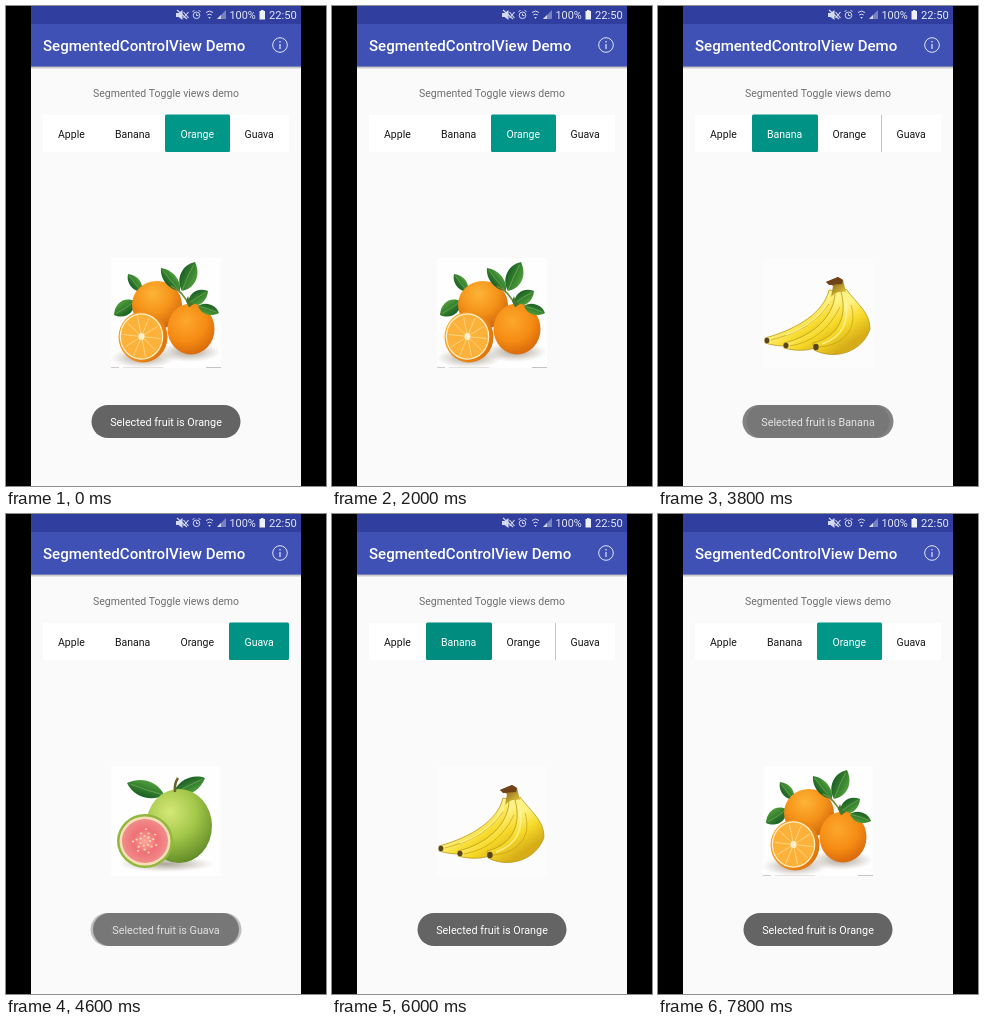
Animation, 320 px wide and 480 px high, one loop 8000 ms. Source, as an HTML page with a canvas:

```html
<!DOCTYPE html>
<html lang="en">
<head>
<meta charset="utf-8">
<title>SegmentedControlView Demo</title>
<style>
  html, body { margin: 0; width: 100%; height: 100%; overflow: hidden; background: #000; }
  canvas { display: block; width: 320px; height: 480px; }
</style>
</head>
<body>
<canvas id="stage"></canvas>
<script>
const canvas = document.getElementById('stage');
const ctx = canvas.getContext('2d');
const ratio = window.devicePixelRatio || 1;
canvas.width = 320 * ratio;
canvas.height = 480 * ratio;
ctx.scale(ratio, ratio);

const LOOP = 8000, FADE = 400, TOAST_DELAY = 100;
const APPLE = 0, BANANA = 1, ORANGE = 2, GUAVA = 3;

const segments = [
  { name: 'Apple', x: 37, end: 94, label: 52, toast: 143 },
  { name: 'Banana', x: 94, end: 160, label: 109, toast: 151 },
  { name: 'Orange', x: 159, end: 224, label: 174.5, toast: 149 },
  { name: 'Guava', x: 223, end: 283, label: 238.5, toast: 146 }
];

// Taps: time, fruit, and optionally when its toast leaves by itself.
const taps = [
  { at: -1000, fruit: ORANGE, leave: 1500 },
  { at: 2130, fruit: APPLE },
  { at: 3480, fruit: BANANA },
  { at: 4290, fruit: GUAVA },
  { at: 5200, fruit: ORANGE },
  { at: 5980, fruit: BANANA },
  { at: 6600, fruit: APPLE },
  { at: 7200, fruit: ORANGE }
];

const clamp = v => Math.max(0, Math.min(1, v));

function rect(x, y, w, h, fill) {
  ctx.fillStyle = fill;
  ctx.fillRect(x, y, w, h);
}

function roundRect(x, y, w, h, r, fill) {
  ctx.beginPath();
  ctx.roundRect(x, y, w, h, r);
  ctx.fillStyle = fill;
  ctx.fill();
}

function text(str, x, y, size, fill, weight = 400, align = 'left') {
  ctx.font = `${weight} ${size}px Roboto, sans-serif`;
  ctx.textAlign = align;
  ctx.fillStyle = fill;
  ctx.fillText(str, x, y);
}

function shape(d, fill, stroke, width = 1) {
  const path = new Path2D(d);
  if (fill) { ctx.fillStyle = fill; ctx.fill(path); }
  if (stroke) { ctx.strokeStyle = stroke; ctx.lineWidth = width; ctx.stroke(path); }
}

function oval(x, y, rx, ry, fill, stroke, width = 1) {
  ctx.beginPath();
  ctx.ellipse(x, y, rx, ry, 0, 0, Math.PI * 2);
  if (fill) { ctx.fillStyle = fill; ctx.fill(); }
  if (stroke) { ctx.strokeStyle = stroke; ctx.lineWidth = width; ctx.stroke(); }
}

function radial(x, y, r, ...colors) {
  const g = ctx.createRadialGradient(x, y, 0, x, y, r);
  colors.forEach((c, i) => g.addColorStop(i / (colors.length - 1), c));
  return g;
}

function linear(x0, y0, x1, y1, ...colors) {
  const g = ctx.createLinearGradient(x0, y0, x1, y1);
  colors.forEach((c, i) => g.addColorStop(i / (colors.length - 1), c));
  return g;
}

function shadow(x, y, rx, ry) {
  ctx.save();
  ctx.translate(x, y);
  ctx.scale(rx, ry);
  oval(0, 0, 1, 1, radial(0, 0, 1, 'rgba(90,75,55,.5)', 'rgba(120,105,85,.3)', 'rgba(150,140,130,0)'));
  ctx.restore();
}

function leaf(x0, y0, x1, y1, width, light = '#4d9c3a', dark = '#1c6124') {
  const len = Math.hypot(x1 - x0, y1 - y0);
  ctx.save();
  ctx.translate(x0, y0);
  ctx.rotate(Math.atan2(y1 - y0, x1 - x0));
  shape(`M0 0C${len * .25} ${-width} ${len * .75} ${-width} ${len} 0C${len * .7} ${width} ${len * .25} ${width} 0 0Z`,
    linear(0, -width * .7, 0, width * .7, dark, light));
  shape(`M0 0Q${len / 2} ${-width * .1} ${len * .9} 0`, null, 'rgba(170,210,130,.6)', .6);
  ctx.restore();
}

function drawOrange() {
  rect(105, 252, 110, 110, '#fefefe');
  shadow(137, 352, 33, 10);
  shadow(183, 346, 32, 10);
  leaf(136, 286, 122, 268, 7);
  leaf(129, 295, 108, 309, 10);
  oval(151, 299, 25, 24, radial(147, 288, 38, '#fdb437', '#f59319', '#c9600a'));
  leaf(174, 285, 155, 262, 8);
  leaf(176, 285, 189, 256, 11);
  leaf(182, 298, 202, 285, 9);
  oval(185, 323, 23.5, 25.5, radial(180, 315, 40, '#fda72d', '#f68c14', '#cd5b08'));
  leaf(192, 300, 213, 307, 7);
  shape('M165 280Q177 285 184 301', null, '#6c8a3c', 1.6);
  shape('M180 295l2-5 2 6 4 2-5 3z', '#44752a');
  oval(137, 331, 24.5, 25.5, linear(112, 320, 162, 345, '#fba325', '#de720a'));
  oval(135.5, 330.5, 21.8, 23.2, '#fff0c4');
  oval(135.5, 330.5, 20.5, 22, '#fbb13a');
  for (let i = 0; i < 10; i++) {
    const a = i * Math.PI / 5 + .1;
    shape(`M135.5 330.5l${19 * Math.cos(a)} ${20.5 * Math.sin(a)}`, null, 'rgba(255,229,160,.75)', .9);
  }
  oval(135.5, 330.5, 3, 3.6, '#fff0cc');
  rect(105, 361, 8, 1, '#ccc');
  rect(117, 361, 40, 1, '#e5e2de');
  rect(200, 361, 15, 1, '#c4c4c4');
}

function drawApple() {
  rect(104, 251, 112, 112, '#f2fdf1');
  const body = 'M162 282C150 273 120 274 117 302C115 326 129 357 146 361C154 363 158 359 165 360C174 363 184 362 193 352C207 336 216 308 211 292C205 274 177 274 162 282Z';
  shape(body, radial(153, 312, 60, '#ed1b25', '#d30e1b', '#8d0714'), '#8d0a15', 1);
  shape('M121 309C122 291 133 281 149 285C163 290 182 279 200 290C207 302 198 317 181 318C162 319 154 303 139 314C129 320 126 332 125 336Q120 324 121 309Z',
    linear(0, 282, 0, 330, 'rgba(255,125,110,.65)', 'rgba(245,30,38,.05)'));
  shape('M121 309C122 291 133 282 149 284', null, 'rgba(255,210,200,.8)', 1.5);
  shape('M183 283Q204 284 207 300', null, 'rgba(255,190,180,.7)', 1.3);
  shape('M205 314Q200 340 184 352', null, 'rgba(255,110,100,.35)', 3);
  oval(162, 283, 12, 3, 'rgba(95,8,10,.55)');
  shape('M160 284C161 274 158 266 153 261L157 259C163 266 165 275 164 284Z', '#693b20', '#482613', .6);
  shape('M152 263C139 248 123 252 119 263Q114 270 109 272C122 277 145 280 152 263Z',
    linear(115, 254, 145, 276, '#a2cf55', '#4d962c'), '#488b2b', .8);
  shape('M151 264Q130 264 113 272M139 264l-8-7M132 266l-8-5M137 265l-6 7', null, '#c5e588', .7);
  shape('M164 272C168 258 181 257 190 267C182 268 173 277 164 272Z',
    linear(170, 260, 178, 274, '#91c849', '#4a922b'), '#468728', .6);
}

function drawBanana() {
  rect(105, 252, 110, 110, '#fcfcfc');
  const edge = '#b99718';
  const skin = (x, y) => linear(x, y, x + 19, y + 29, '#fff284', '#f6d928', '#d6ad18');
  shape('M171 284C166 306 140 323 107 332L107 337C137 346 166 335 184 303L181 286Z', skin(138, 311), edge, .8);
  shape('M177 286C177 310 155 330 126 337L126 342C156 350 181 337 193 302L185 285Z', skin(154, 311), edge, .8);
  shape('M183 286C190 311 180 331 155 337L156 344C178 355 205 345 212 323C212 306 199 298 188 283Z', skin(177, 306), edge, .8);
  shape('M171 298Q153 325 113 334M182 301Q166 334 132 340M193 299C201 325 183 340 160 341', null, 'rgba(185,143,16,.55)', 1);
  shape('M172 293Q160 317 128 329M187 293Q195 327 164 338', null, 'rgba(255,248,170,.7)', 1.6);
  shape('M168 276L180 271L185 274L188 286Q180 283 173 291L175 280Z', linear(170, 272, 183, 290, '#6b4718', '#a88528', '#e0c635'));
  shape('M168 276L180 271L185 274L184 278L171 279Z', '#6f421b');
  oval(109, 334.5, 2.4, 2.8, '#57431d');
  oval(128, 339.5, 2.5, 2.8, '#57431d');
  oval(158, 341, 2.7, 3.2, '#57431d');
}

function drawGuava() {
  rect(105, 252, 110, 110, '#fefefe');
  shadow(160, 350, 48, 8);
  leaf(158, 281, 121, 269, 11);
  leaf(167, 280, 199, 264, 10);
  oval(173, 312, 33, 37, radial(164, 298, 52, '#d5e877', '#a4c84a', '#638d28'));
  shape('M169 278Q168 270 172 264', null, '#6c602b', 2.5);
  oval(139, 327, 28, 27, '#92b73d');
  oval(139, 327, 25.5, 24.5, '#f6dfb8');
  oval(139, 327, 23, 22, radial(139, 327, 23, '#ffaaa0', '#ef7178', '#f18e8b'));
  for (let i = 0; i < 20; i++) {
    const a = i * 2.4, r = 5 + (i % 3) * 3.5;
    oval(139 + r * Math.cos(a), 327 + r * Math.sin(a), 1.2, .9, '#f9dfa9');
  }
}

const pictures = [drawApple, drawBanana, drawOrange, drawGuava];

function drawStatusBar() {
  rect(25, 0, 270, 18, '#303f9f');
  const pale = '#d5d9ef';
  shape('M170 7h2.5l4-3v10l-4-3h-2.5z', pale);
  shape('M177.5 6l5 6m0-6l-5 6M171 4l10 9', null, pale, 1.1);
  oval(190.5, 9.3, 3.3, 3.3, null, pale);
  shape('M190.5 7.5v2h1.8M186.5 6l2-2M194.5 6l-2-2', null, pale, 1);
  shape('M200 6.5Q203.5 3.5 207 6.5M201.3 9Q203.5 7.2 205.7 9', null, pale, 1);
  shape('M202.2 11h2.6l-1.3 2z', pale);
  shape('M220 4v9h-9z', 'rgba(255,255,255,.35)');
  shape('M215 9v4h-4z', pale);
  text('100%', 223.5, 13, 10.9, '#e4e7f5');
  rect(253.5, 5, 5.5, 8.5, '#eef0fa');
  rect(255, 4, 2.5, 1, '#eef0fa');
  text('22:50', 263, 13, 11.2, '#e4e7f5');
}

function drawHeader() {
  rect(25, 60, 270, 3.5, linear(0, 60, 0, 63.5, 'rgba(0,0,0,.32)', 'rgba(0,0,0,0)'));
  rect(25, 18, 270, 42.5, '#3f51b5');
  text('SegmentedControlView Demo', 37, 45, 15.05, '#fff', 500);
  oval(274, 39, 7.3, 7.3, null, '#e2e5f5');
  rect(273.4, 38, 1.2, 5, '#e2e5f5');
  rect(273.4, 35, 1.2, 1.5, '#e2e5f5');
  text('Segmented Toggle views demo', 160, 91, 10.5, '#6e6e6e', 400, 'center');
}

function drawSegments(selected, age) {
  rect(37, 109, 246, 37, '#fff');
  segments.forEach((s, i) => {
    const on = i === selected;
    if (on) {
      const area = [s.x, 108.5, s.end - s.x, 37.5, 1.5];
      roundRect(...area, '#009688');
      roundRect(...area, `rgba(0,0,0,${.07 * clamp(1 - age / 500)})`);
    } else if (i > selected + 1) {
      rect(s.x, 109, 1, 37, '#c4c4c4');
    }
    text(s.name, s.label, 132, 10.5, on ? '#fff' : '#161616');
  });
}

function drawToast(fruit, alpha) {
  if (alpha <= 0) return;
  const { name, toast } = segments[fruit];
  ctx.globalAlpha = alpha;
  roundRect(160 - toast / 2, 399, toast, 33, 16.5, '#646464');
  text('Selected fruit is ' + name, 160, 419.5, 10.8, '#fff', 400, 'center');
  ctx.globalAlpha = 1;
}

function drawToasts(t) {
  taps.forEach((tap, i) => {
    const leave = tap.leave ?? (taps[i + 1] ? taps[i + 1].at : Infinity);
    const enter = clamp((t - tap.at - TOAST_DELAY) / FADE);
    const exit = clamp((t - leave) / FADE);
    drawToast(tap.fruit, (1 - (1 - enter) ** 2) * (1 - exit ** 2));
  });
}

function draw(t) {
  rect(0, 0, 320, 480, '#000');
  rect(25, 0, 270, 480, '#fafafa');
  drawStatusBar();
  drawHeader();
  const tap = taps.filter(e => e.at <= t).pop();
  drawSegments(tap.fruit, t - tap.at);
  pictures[tap.fruit]();
  drawToasts(t);
}

const start = performance.now();
function tick() {
  draw((performance.now() - start) % LOOP);
  requestAnimationFrame(tick);
}
tick();
</script>
</body>
</html>
```
